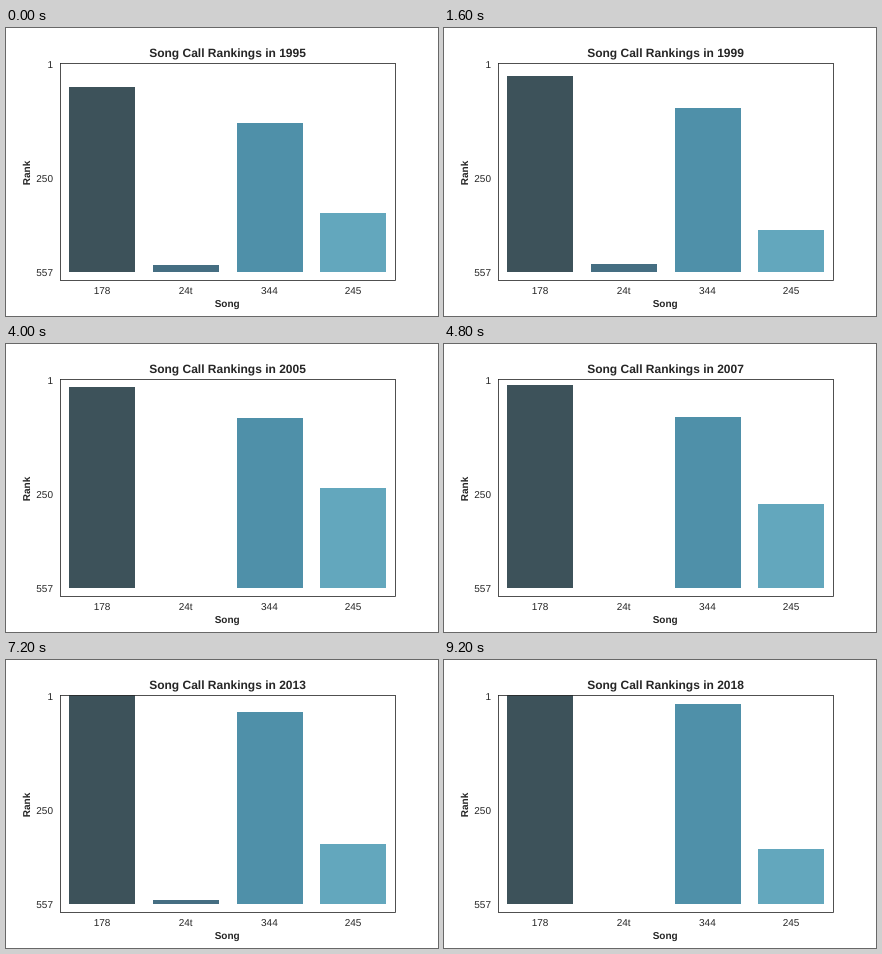
Animation, 432 px wide and 288 px high, one loop 9600 ms. Source, as an HTML page:

```html
<!DOCTYPE html>
<html lang="en">
<head>
<meta charset="utf-8">
<title>Song Call Rankings</title>
<style>
  html, body { margin: 0; width: 100%; height: 100%; overflow: hidden; background: #fff; }
  svg { display: block; }
  text {
    font: 10px "Liberation Sans", Arial, sans-serif;
    text-rendering: geometricPrecision;
    text-anchor: middle;
    fill: #262626;
  }
  .bold { font-weight: bold; }
  .title { font-size: 12px; font-weight: bold; }
  .tick { text-anchor: end; }
</style>
</head>
<body>
<svg id="chart" width="432" height="288" viewBox="0 0 432 288">
  <rect width="432" height="288" fill="#fff"/>
  <g id="bars" shape-rendering="crispEdges"></g>
  <rect x="54.5" y="35.5" width="335" height="217" fill="none" stroke="#262626" stroke-width="0.8"/>
  <text id="title" class="title" x="221.5" y="29"></text>
  <text class="bold" x="221.2" y="279">Song</text>
  <text class="bold" transform="translate(24 145) rotate(-90)">Rank</text>
</svg>
<script>
const NS = "http://www.w3.org/2000/svg";
const FIRST = 1995, YEARS = 24, STEP = 400;
const BASE = 244, LEFT = 63.2, PITCH = 83.7, WIDTH = 66;

// Each trend is a few turning points: [years since the first, bar top].
const songs = [
  { name: "178", color: "#3d525a",
    trend: [[0, 59], [4, 48], [12, 41], [18, 35], [23, 35]] },
  { name: "24t", color: "#456e82",
    trend: [[0, 237], [3, 239], [4, 236], [7, 244], [9, 241], [10, 244], [12, 244],
            [13, 235], [15, 235], [16, 244], [18, 240], [19, 240], [21, 244], [23, 244]] },
  { name: "344", color: "#4f90a9",
    trend: [[0, 95], [4, 80], [7, 76], [12, 73], [16, 53], [18, 52], [23, 44]] },
  { name: "245", color: "#63a7bd",
    trend: [[0, 185], [3, 191], [4, 202], [7, 146], [11, 143], [12, 160], [18, 184], [19, 193], [23, 189]] }
];

function add(parent, tag, attrs, text = "") {
  const el = document.createElementNS(NS, tag);
  for (const key in attrs) el.setAttribute(key, attrs[key]);
  el.textContent = text;
  return parent.appendChild(el);
}

function topAt(trend, n) {
  const i = Math.max(1, trend.findIndex(point => point[0] >= n));
  const [n0, y0] = trend[i - 1], [n1, y1] = trend[i];
  return Math.round(y0 + (y1 - y0) * (n - n0) / (n1 - n0));
}

const chart = document.getElementById("chart");
const bars = document.getElementById("bars");
const title = document.getElementById("title");

songs.forEach((song, i) => {
  const x = LEFT + PITCH * i;
  song.bar = add(bars, "rect", { x: Math.round(x), width: WIDTH, fill: song.color });
  add(chart, "text", { x: x + WIDTH / 2 - 0.2, y: 266 }, song.name);
});

for (const rank of [1, 250, 557]) {
  const y = Math.round(BASE + 4 - (557 - rank) * 0.375);
  add(chart, "text", { class: "tick", x: 47, y: rank === 250 ? 154 : y }, rank);
}

let shown = -1;
function draw(time) {
  const n = Math.floor(time / STEP) % YEARS;
  if (n === shown) return;
  shown = n;
  title.textContent = "Song Call Rankings in " + (FIRST + n);
  for (const song of songs) {
    const top = topAt(song.trend, n);
    song.bar.setAttribute("y", top);
    song.bar.setAttribute("height", BASE - top);
  }
}

const start = performance.now();
function tick() {
  draw(performance.now() - start);
  requestAnimationFrame(tick);
}
tick();
</script>
</body>
</html>
```
